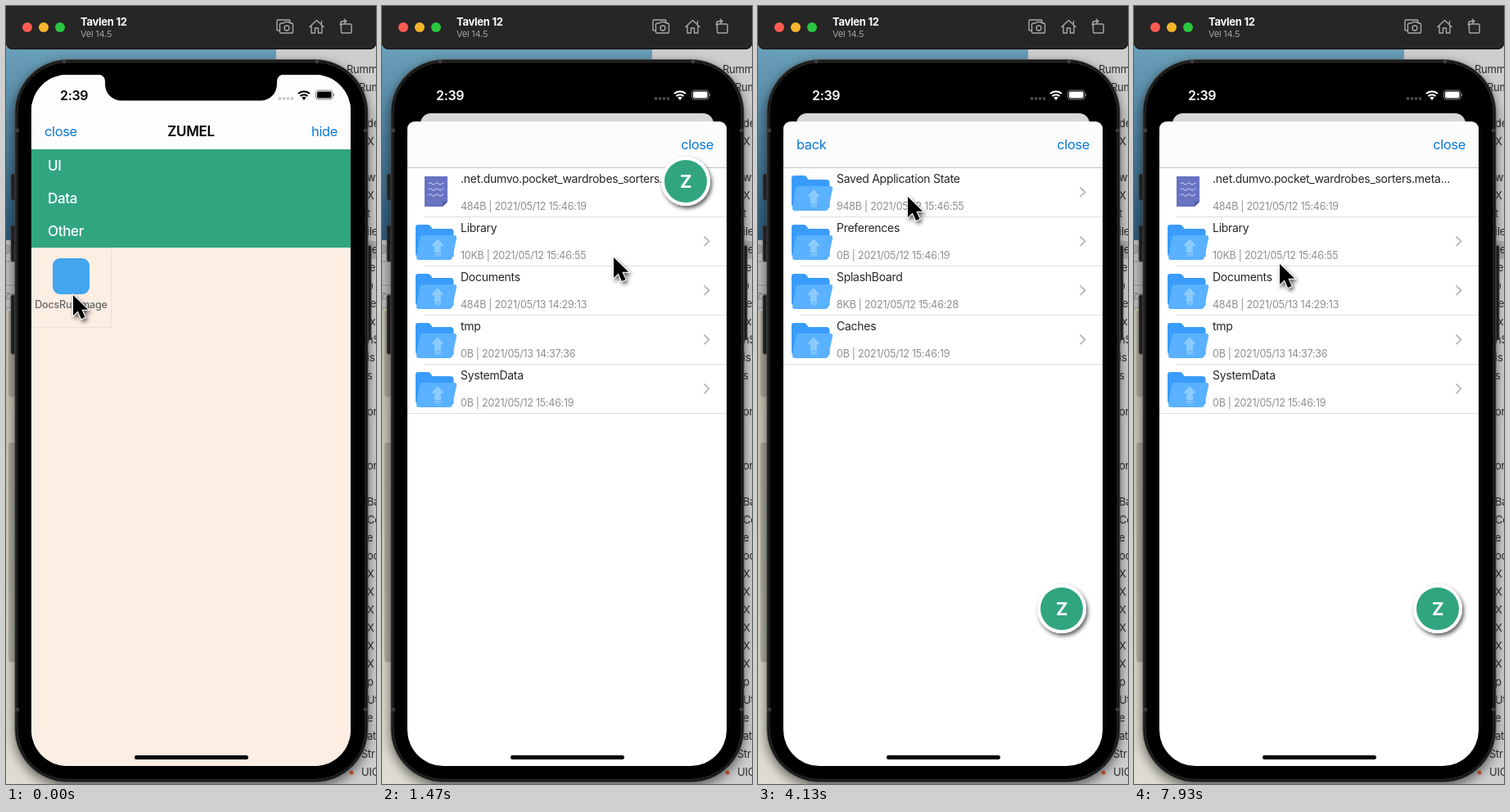
An HTML page that plays this animation: 452x950 px, repeating every 8 s.

```html
<!DOCTYPE html>
<html lang="en">
<head>
<meta charset="utf-8">
<title>File panel demo</title>
<style>
html,body{margin:0;width:100%;height:100%;overflow:hidden;background:#000}
svg{display:block;width:452px;height:950px}
text{font-family:Inter,"Open Sans",sans-serif;letter-spacing:-.02em;white-space:pre}
.name{font-size:14px;fill:#262626}
.info{font-size:12.5px;fill:#8e8e92}
.link{font-size:16.4px;fill:#0b78d8}
.menu{font-size:17px;font-weight:500;fill:#fff}
.side{font-size:13px;fill:#2b2b2b}
.end{text-anchor:end}
.mid{text-anchor:middle}
</style>
</head>
<body>
<svg viewBox="0 0 452 950">
<defs>
  <clipPath id="screen"><rect x="31" y="84" width="390" height="844" rx="44"/></clipPath>
  <linearGradient id="sky" x1="0" y1="0" x2="0" y2="1">
    <stop offset="0" stop-color="#6ba0ba"/><stop offset="1" stop-color="#2d5878"/>
  </linearGradient>
  <linearGradient id="sand" x1="0" y1="0" x2="0" y2="1">
    <stop offset="0" stop-color="#c3c0ae"/><stop offset="1" stop-color="#dfddd2"/>
  </linearGradient>
  <filter id="soft" x="-40%" y="-40%" width="180%" height="180%">
    <feDropShadow dx="2" dy="3" stdDeviation="2.5" flood-opacity=".65"/>
  </filter>
  <filter id="wide" x="-10%" y="-10%" width="120%" height="120%">
    <feDropShadow dx="0" dy="5" stdDeviation="7" flood-opacity=".55"/>
  </filter>
  <g id="folder">
    <path d="M44 10h12q2 0 3.500 2l2 3h22q4 0 4 4v30H45q-4 0-4-4V13q0-3 3-3z" fill="#3a9cfa"/>
    <path d="M50 23h38q4 0 3 4l-5 23q-.6 3-4 3H45q-3 0-3-3l4-23q.6-4 4-4z" fill="#59b1ff"/>
    <path d="M68 27l8 9h-4v8h-8v-8h-4zM64 45h8v1.600h-8zM64 47.500h8v1h-8z" fill="#8bcbff"/>
  </g>
  <g id="doc">
    <path d="M52 11h28v31l-6 6H52z" fill="#6873c2"/>
    <path d="M80 42l-6 6v-6z" fill="#4d58a6"/>
    <path d="M57 20q2-2 4 0t4 0 4 0 4 0 2 0M57 27q2-2 4 0t4 0 4 0 4 0 2 0M57 34q2-2 4 0t4 0 4 0 4 0 2 0" fill="none" stroke="#a9b1e6" stroke-width="1.300"/>
  </g>
</defs>

<g id="desktop">
  <rect width="452" height="950" fill="#cecece"/>
  <rect y="50" width="330" height="236" fill="url(#sky)"/>
  <rect y="286" width="30" height="86" fill="#bcbcbc"/>
  <circle cx="1" cy="297" r="5" fill="#a3a3a3" stroke="#888"/>
  <path d="M0 312h12M0 341h12M0 368h12" stroke="#8f8f8f"/>
  <text class="side" x="-2" y="358" style="font-size:11px;fill:#777">Ze</text>
  <rect y="370" width="60" height="580" fill="url(#sand)"/>
  <g fill="#77766a" opacity=".38">
    <rect x="3" y="372" width="12" height="105" rx="3"/>
    <rect x="3" y="533" width="12" height="268" rx="3"/>
    <rect x="3" y="642" width="12" height="140" rx="3"/>
  </g>
  <rect x="440" y="287" width="12" height="22" fill="#aeaeae"/>
  <g id="side"></g>
</g>

<g id="phone">
  <g fill="#252525" stroke="#555" stroke-width=".8">
    <rect x="6" y="205" width="8" height="32" rx="2"/>
    <rect x="6" y="268" width="8" height="44" rx="2"/>
    <rect x="6" y="353" width="8" height="72" rx="2"/>
    <rect x="438" y="293" width="8" height="115" rx="2"/>
  </g>
  <rect x="10.500" y="65" width="432" height="883" rx="65" fill="#4a4a4a" filter="url(#wide)"/>
  <rect x="11.500" y="66" width="430" height="881" rx="64" fill="#171717"/>
  <rect x="14" y="68.500" width="425" height="876" rx="61" fill="#000" stroke="#303030"/>
  <path d="M11 152h5M437 152h5M11 859h5M437 859h5M71 66v4M380 66v4" stroke="#3d3d3d" stroke-width="4"/>
</g>

<g clip-path="url(#screen)">
  <g id="app">
    <rect id="appBack" x="31" y="84" width="390" height="860" fill="#fff"/>
    <rect x="131" y="184" width="100" height="100" fill="#ff0a00"/>
    <rect id="dim" x="31" y="84" width="390" height="860"/>
  </g>
  <g id="sheet">
    <rect x="31" width="390" height="810" rx="10" fill="#fff"/>
    <path d="M31 56V10q0-10 10-10h370q10 0 10 10v46z" fill="#fcfcfd"/>
    <path d="M31 56.500h390" stroke="#c4c4c6"/>
    <text class="link end" x="405" y="34">close</text>
    <g id="root"></g>
    <g id="library"><text class="link" x="47" y="34">back</text></g>
  </g>
  <g id="kit">
    <rect x="31" y="84" width="390" height="844" fill="#fdeee4"/>
    <rect x="31" y="84" width="390" height="91" fill="#fdfdfd"/>
    <text class="link" x="47" y="159">close</text>
    <text class="link end" x="405" y="159">hide</text>
    <text class="mid" x="226" y="159" font-size="17" font-weight="600">ZUMEL</text>
    <rect x="31" y="175" width="390" height="120" fill="#30a580"/>
    <text class="menu" x="51" y="201">UI</text>
    <text class="menu" x="51" y="241">Data</text>
    <text class="menu" x="51" y="281">Other</text>
    <path d="M31 295.500h97.500v97H31" fill="none" stroke="#eadfd7"/>
    <rect x="57" y="308" width="45" height="44" rx="9" fill="#43a6ee"/>
    <text class="mid" x="79.500" y="369" font-size="12.600" font-weight="500" fill="#656565">DocsRummage</text>
  </g>
</g>
<path d="M112 83.500q9 .5 9 9v3a20 20 0 0 0 20 20h170a20 20 0 0 0 20-20v-3q0-8.500 9-9z"/>
<g id="status">
  <text x="66" y="114.500" font-size="16" font-weight="600">2:39</text>
  <g id="dots" fill="#c9c9cb"></g>
  <path d="M357 107a10.500 10.500 0 0 1 14 0M359.500 110a6.800 6.800 0 0 1 9 0" fill="none" stroke="currentColor" stroke-width="2.200"/>
  <path d="M364 115l-2.700-2.900a4 4 0 0 1 5.400 0z"/>
  <rect x="378.500" y="103" width="20.500" height="11" rx="3" fill="none" stroke="currentColor" opacity=".5"/>
  <rect x="380" y="104.500" width="17.500" height="8" rx="1.700"/>
  <path d="M400 106.500q2 2 0 4z" opacity=".6"/>
</g>
<rect x="157" y="915" width="139" height="5" rx="2.500"/>

<g id="ball">
  <circle r="30" fill="#fff" filter="url(#soft)"/>
  <circle r="26" fill="#30a580"/>
  <text class="mid" y="8" font-size="22" font-weight="700" fill="#fff">Z</text>
</g>

<g id="bar">
  <path d="M0 0h452v44q0 9-9 9H9q-9 0-9-9z" fill="#262626"/>
  <path d="M0 44q0 8.500 9 8.500h434q9 0 9-8.500" fill="none" stroke="#111"/>
  <circle cx="26" cy="26" r="6" fill="#ff5b52"/>
  <circle cx="46" cy="26" r="6" fill="#f6b52b"/>
  <circle cx="66" cy="26" r="6" fill="#2bc53f"/>
  <text x="91" y="24" font-size="13" font-weight="700" fill="#fff">Tavlen 12</text>
  <text x="91" y="38" font-size="11" fill="#a0a0a0">Vel 14.5</text>
  <g fill="none" stroke="#a8a8a8" stroke-width="1.400" stroke-linejoin="round">
    <path d="M334 30h-1.500q-1.500 0-1.500-1.500v-10q0-1.500 1.500-1.500h13q1.500 0 1.500 1.500V20M336 21h3l1.500-1.500h5L347 21h2q1.500 0 1.500 1.500v9q0 1.500-1.500 1.500h-13q-1.500 0-1.500-1.500v-9q0-1.500 1.500-1.500z"/>
    <circle cx="343" cy="27" r="3"/>
    <path d="M370.500 26l9-8.500 9 8.500M373 24v9h4.500v-6h4v6h4.500v-9M385.500 18v4"/>
    <path d="M411 22h9.500q1.500 0 1.500 1.500v8q0 1.500-1.500 1.500h-9.500q-1.500 0-1.500-1.500v-8q0-1.500 1.500-1.500zM408.500 24v-2q0-3.500 4-3.500h3M413 16l3 2.500-3 2.500"/>
  </g>
</g>

<path id="cursor" d="M0 0V25l5.800-5.400 4.200 9.400 4.600-2-4.200-9.200h7.800z" fill="#000" stroke="#fff" stroke-width="1.800" paint-order="stroke" filter="url(#soft)"/>
</svg>
<script>
const LOOP = 8000;
const OPEN = 470, DRAG = 1860, DROP = 2400, ENTER = 3530, LEAVE = 6760;
const $ = id => document.getElementById(id);
const add = (id, markup) => $(id).insertAdjacentHTML('beforeend', markup);

const row = ([name, info, kind = 'folder'], i, all) => {
  const last = i === all.length - 1;
  const arrow = kind === 'folder'
    ? '<path d="M393.500 24.500l6 5.700-6 5.700" fill="none" stroke="#bdbdc0" stroke-width="2"/>' : '';
  return `<g transform="translate(0 ${56 + i * 60})">
    <use href="#${kind}"/>${arrow}
    <text class="name" x="96" y="18.500">${name}</text>
    <text class="info" x="96" y="52">${info}</text>
    <path d="M${last ? 31 : 51} 60.500H421" stroke="#dededf"/></g>`;
};

add('root', [
  ['.net.dumvo.pocket_wardrobes_sorters.meta...', '484B | 2021/05/12 15:46:19', 'doc'],
  ['Library', '10KB | 2021/05/12 15:46:55'],
  ['Documents', '484B | 2021/05/13 14:29:13'],
  ['tmp', '0B | 2021/05/13 14:37:36'],
  ['SystemData', '0B | 2021/05/12 15:46:19']
].map(row).join(''));

add('library', [
  ['Saved Application State', '948B | 2021/05/12 15:46:55'],
  ['Preferences', '0B | 2021/05/12 15:46:19'],
  ['SplashBoard', '8KB | 2021/05/12 15:46:28'],
  ['Caches', '0B | 2021/05/12 15:46:19']
].map(row).join(''));

// Word ends peeking out beside the device
const words = 'Rumma,Rumm,,de,X,,w,X,t,ile,ile,le,o,te,.x,nS,is,s,,or,,,or,,Bag,Co,e,oc,X,X,X,X,X,X,p,Ut,e,at,Str,UIC';
const sideX = i => i === 0 ? 416 : i === 1 ? 431 : i > 37 ? 434 : 441;
add('side', words.split(',').map((w, i) =>
  `<text class="side" x="${sideX(i)}" y="${82 + i * 22}">${w}</text>`).join('') +
  '<circle cx="422" cy="936" r="2.500" fill="#e2633a"/>');
add('dots', [335, 340, 345, 350].map(x => `<circle cx="${x - .5}" cy="113" r="1.900"/>`).join(''));

// Pointer stops: time, x, y
const stops = [
  [0, 82, 353], [270, 82, 353], [600, 213, 353], [900, 250, 346],
  [1470, 283, 307], [1800, 373, 215], [DRAG, 373, 215], [2300, 369, 737],
  [2500, 369, 737], [3380, 180, 285], [3850, 180, 285], [4130, 183, 233],
  [4530, 190, 262], [5000, 190, 262], [5700, 150, 238], [6540, 77, 172],
  [6800, 77, 172], [7600, 178, 315], [LOOP, 178, 315]
];

const clamp = x => Math.max(0, Math.min(1, x));
const ease = x => x * x * (3 - 2 * x);
const mix = (a, b, k) => a + (b - a) * k;

function pointer(t) {
  const i = Math.max(1, stops.findIndex(s => s[0] >= t));
  const [t0, x0, y0] = stops[i - 1], [t1, x1, y1] = stops[i];
  const k = ease(clamp((t - t0) / (t1 - t0)));
  return [mix(x0, x1, k), mix(y0, y1, k)];
}

function ballAt(t) {
  if (t < DRAG) return [371, 214];
  const [x, y] = pointer(Math.min(t, DROP));
  return [mix(x - 2, 371, ease(clamp((t - DROP) / 200))), y - 1];
}

// Critically damped spring
function rise(t) {
  const u = Math.max(0, t - OPEN) * .0141;
  return 1 - (1 + u) * Math.exp(-u);
}

const move = (id, [x, y]) => $(id).setAttribute('transform', `translate(${x} ${y})`);
const show = (id, on) => $(id).setAttribute('display', on ? 'inline' : 'none');

function draw(t) {
  const p = rise(t), inside = t >= ENTER && t < LEAVE;
  show('kit', t < OPEN);
  show('ball', t >= OPEN);
  show('root', !inside);
  show('library', inside);

  $('app').setAttribute('transform',
    `translate(226 ${84 + 47 * p}) scale(${1 - .082 * p}) translate(-226 -84)`);
  const radius = 14 * clamp(p * 3);
  $('appBack').setAttribute('rx', radius);
  $('dim').setAttribute('rx', radius);
  $('dim').setAttribute('opacity', .155 * p);
  move('sheet', [0, mix(928, 141, p)]);

  const tone = Math.round(255 * p ** 2.5);
  const ink = `rgb(${tone},${tone},${tone})`;
  $('status').setAttribute('fill', ink);
  $('status').setAttribute('color', ink);
  $('dots').setAttribute('fill', p > .7 ? '#484848' : '#c9c9cb');

  move('ball', ballAt(t));
  move('cursor', pointer(t));
}

const start = performance.now();
function tick() {
  draw((performance.now() - start) % LOOP);
  requestAnimationFrame(tick);
}
tick();
</script>
</body>
</html>
```
